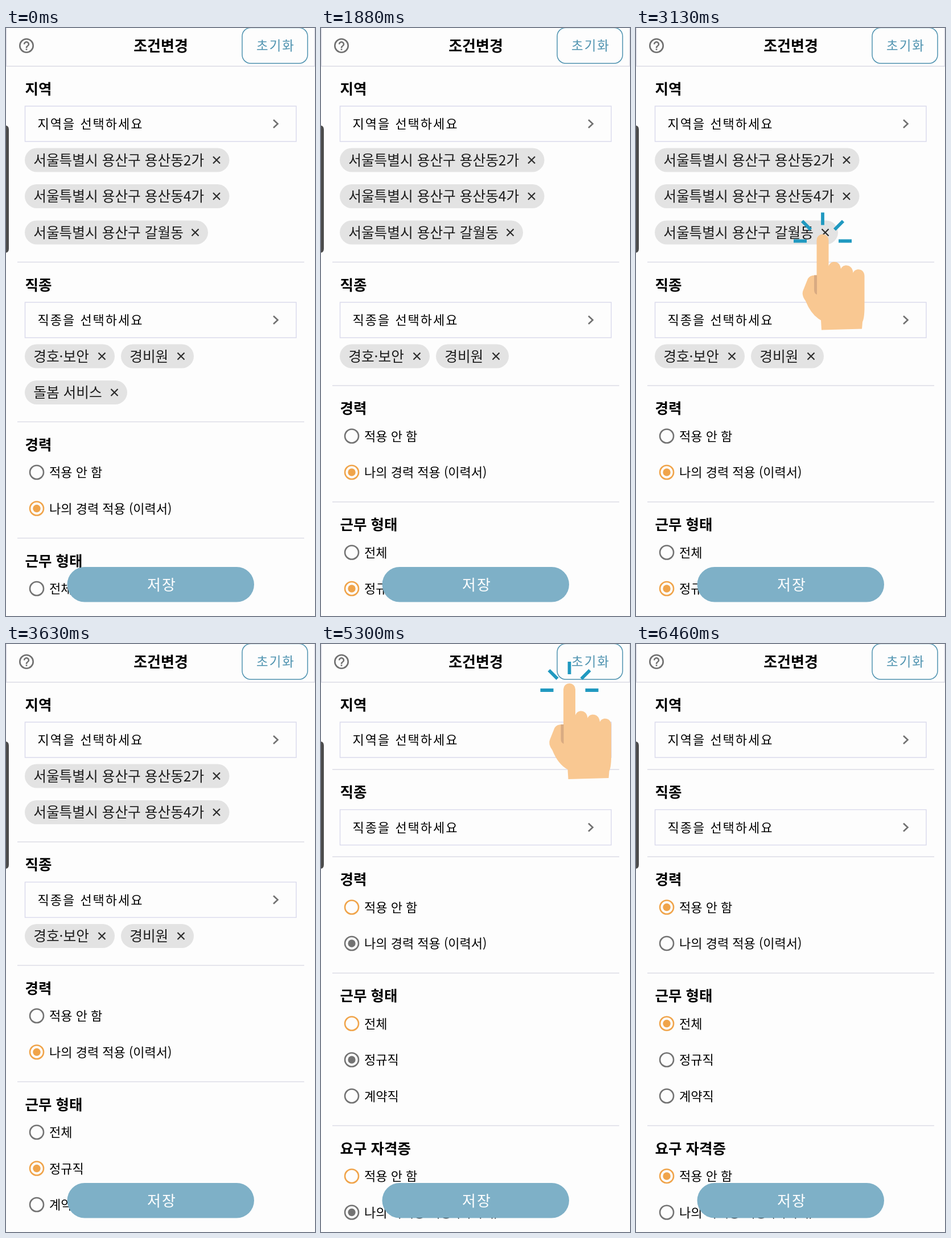
These frames come from a looping animation (543x1031 px, 6500 ms). An HTML page:

```html
<!DOCTYPE html>
<html lang="ko">
<head>
<meta charset="utf-8">
<style>
html, body { margin: 0; width: 100%; height: 100%; overflow: hidden; background: #fdfdfd; }
svg { display: block; width: 543px; height: 1031px; font-family: "Noto Sans CJK KR", "Noto Sans CJK", sans-serif; }
.rule { stroke: #dcdce6; stroke-width: 1.6; }
.box { fill: none; stroke: #d9d9ec; stroke-width: 1.4; }
.icon { fill: none; stroke: #707070; stroke-width: 2.6; }
.cross { stroke: #2c2c2c; stroke-width: 2.2; }
.ring { fill: none; stroke-width: 2.6; }
</style>
</head>
<body>
<svg viewBox="0 0 543 1031">
  <g id="page"></g>
  <path d="M0 171Q5 172 5 178V387Q5 393 0 394Z" fill="#4b4b4b"/>
  <g id="bar">
    <path class="rule" fill="none" d="M.5 0V67H542.5V0"/>
    <g transform="translate(20.4 15.4) scale(1.3)" fill="#707070">
      <circle class="icon" cx="12" cy="12" r="9" style="stroke-width:2"/>
      <path d="M11 18h2v-2h-2zM12 6c-2.2 0-4 1.8-4 4h2c0-1.1.9-2 2-2s2 .9 2 2c0 2-3 1.75-3 5h2c0-2.25 3-2.5 3-5 0-2.2-1.8-4-4-4z"/>
    </g>
    <rect x="415" y="-.5" width="115" height="62.5" rx="15" fill="#fdfdfd" stroke="#4f93b0" stroke-width="1.5"/>
    <rect x="107.5" y="945" width="328.5" height="61.5" rx="30.7" fill="#7eb0c7"/>
  </g>
  <g id="hand">
    <path fill="#f9c892" d="M-10.5 10.5A10.5 10.5 0 0 1 10.5 10.5V56C14 45 31 46 32 61C36 51 53 53 53.5 68C57 58 73.5 60 73.5 73V132Q73 148 70 154L69 166L-2 168L-3 151Q-20 142 -30 117Q-38 106 -34 98L-26 78Q-22 71 -10.5 72Z"/>
    <path fill="#d9ab82" d="M-15 72H-10V106Q-15 104 -15 98Z"/>
    <path fill="none" stroke="#2099c0" stroke-width="5.8" d="M0 -38V-16M-36 -23L-21 -8M36 -23L21 -8M-51 12H-28M28 12H51"/>
  </g>
</svg>
<script>
const LOOP = 6500, DROP_JOB = 1500, DROP_AREA = 3350, RESET = 5288, FADE = 250;
const ROW = 63.5, ORANGE = '#f0a44a', GRAY = '#737373';
// start, end, fingertip x, fingertip y
const taps = [[850, 1550, 204, 614], [2700, 3400, 328, 361.5], [4750, 5600, 436.5, 69]];
const page = document.getElementById('page'), bar = document.getElementById('bar'), hand = document.getElementById('hand');

function add(parent, tag, attrs, content) {
  const el = document.createElementNS('http://www.w3.org/2000/svg', tag);
  for (const k in attrs) el.setAttribute(k, attrs[k]);
  if (content) el.textContent = content;
  return parent.appendChild(el);
}
const text = (parent, s, x, cy, size, more) =>
  add(parent, 'text', { x, y: cy + size * 0.37, 'font-size': size, ...more }, s);
const move = (el, x, y) => el.setAttribute('transform', `translate(${x} ${y})`);
const show = (el, on) => el.setAttribute('display', on ? 'inline' : 'none');

// Each section is laid out from the rule above it.
function section(title, hasRule = true) {
  const g = add(page, 'g');
  if (hasRule) add(g, 'path', { class: 'rule', d: 'M20 0H524' });
  text(g, title, 33.5, 40, 25.5, { 'font-weight': 600 });
  return g;
}

function picker(g, label) {
  add(g, 'rect', { class: 'box', x: 33.5, y: 70.5, width: 476.5, height: 62 });
  text(g, label, 55.5, 101.5, 22, { 'letter-spacing': 2 });
  add(g, 'path', { class: 'icon', d: 'M470 94.5l7.5 7l-7.5 7' });
}

function chip(g, label, row, left, right) {
  const c = add(g, 'g'), y = 165 + row * ROW;
  add(c, 'rect', { x: left, y: y - 21, width: right - left, height: 42, rx: 21, fill: '#e3e3e3' });
  text(c, label, left + 15.2, y, 24.7, { fill: '#1c1c1c' });
  add(c, 'path', { class: 'cross', d: `M${right - 28.5} ${y - 6}l12 12m0 -12l-12 12` });
  return c;
}

const radios = [];
function options(g, labels, chosen) {
  labels.forEach((label, i) => {
    const cy = 88.5 + i * ROW;
    radios.push({
      ring: add(g, 'circle', { class: 'ring', cx: 54, cy, r: 12 }),
      dot: add(g, 'circle', { cx: 54, cy }),
      before: i === chosen, after: i === 0
    });
    text(g, label, 76, cy, 22);
  });
}

const area = section('지역', false), job = section('직종'), career = section('경력'),
      type = section('근무 형태'), license = section('요구 자격증');
move(area, 0, 66.5);
picker(area, '지역을 선택하세요');
picker(job, '직종을 선택하세요');
const areaChips = [
  chip(area, '서울특별시 용산구 용산동2가', 0, 33, 392.5),
  chip(area, '서울특별시 용산구 용산동4가', 1, 33, 392.5),
  chip(area, '서울특별시 용산구 갈월동', 2, 33, 355)
];
const jobChips = [
  chip(job, '경호·보안', 0, 33, 191),
  chip(job, '경비원', 0, 202, 330),
  chip(job, '돌봄 서비스', 1, 33, 213)
];
options(career, ['적용 안 함', '나의 경력 적용 (이력서)'], 1);
options(type, ['전체', '정규직', '계약직'], 1);
options(license, ['적용 안 함', '나의 자격증 적용 (이력서)'], 1);

const middle = { 'text-anchor': 'middle' };
text(bar, '조건변경', 272, 31.5, 26, { ...middle, 'font-weight': 600 });
text(bar, '초기화', 474, 31, 22.4, { ...middle, 'letter-spacing': 2, fill: '#4f93b0' });
text(bar, '저장', 274, 976, 26, { ...middle, 'letter-spacing': 2, fill: '#fff' });

function draw(t) {
  const done = t >= RESET;
  const areas = done ? 0 : t < DROP_AREA ? 3 : 2;
  const jobs = done ? 0 : t < DROP_JOB ? 3 : 2;
  areaChips.forEach((c, i) => show(c, i < areas));
  jobChips.forEach((c, i) => show(c, i < jobs));

  let y = 220 + areas * ROW;
  move(job, 0, y);
  move(career, 0, y += 153 + Math.ceil(jobs / 2) * ROW);
  move(type, 0, y += 204);
  move(license, 0, y + 267.5);

  const p = Math.min(1, Math.max(0, (t - RESET) / FADE)), k = p * p * (3 - 2 * p);
  for (const r of radios) {
    const color = (done ? r.after : r.before) ? ORANGE : GRAY;
    r.ring.setAttribute('stroke', color);
    r.dot.setAttribute('fill', color);
    r.dot.setAttribute('r', 6.7 * (r.before * (1 - k) + r.after * k));
  }

  const tap = taps.find(([from, to]) => t >= from && t < to);
  show(hand, tap);
  if (tap) move(hand, tap[2], tap[3]);
}

const start = performance.now();
function tick() {
  draw((performance.now() - start) % LOOP);
  requestAnimationFrame(tick);
}
tick();
</script>
</body>
</html>
```
